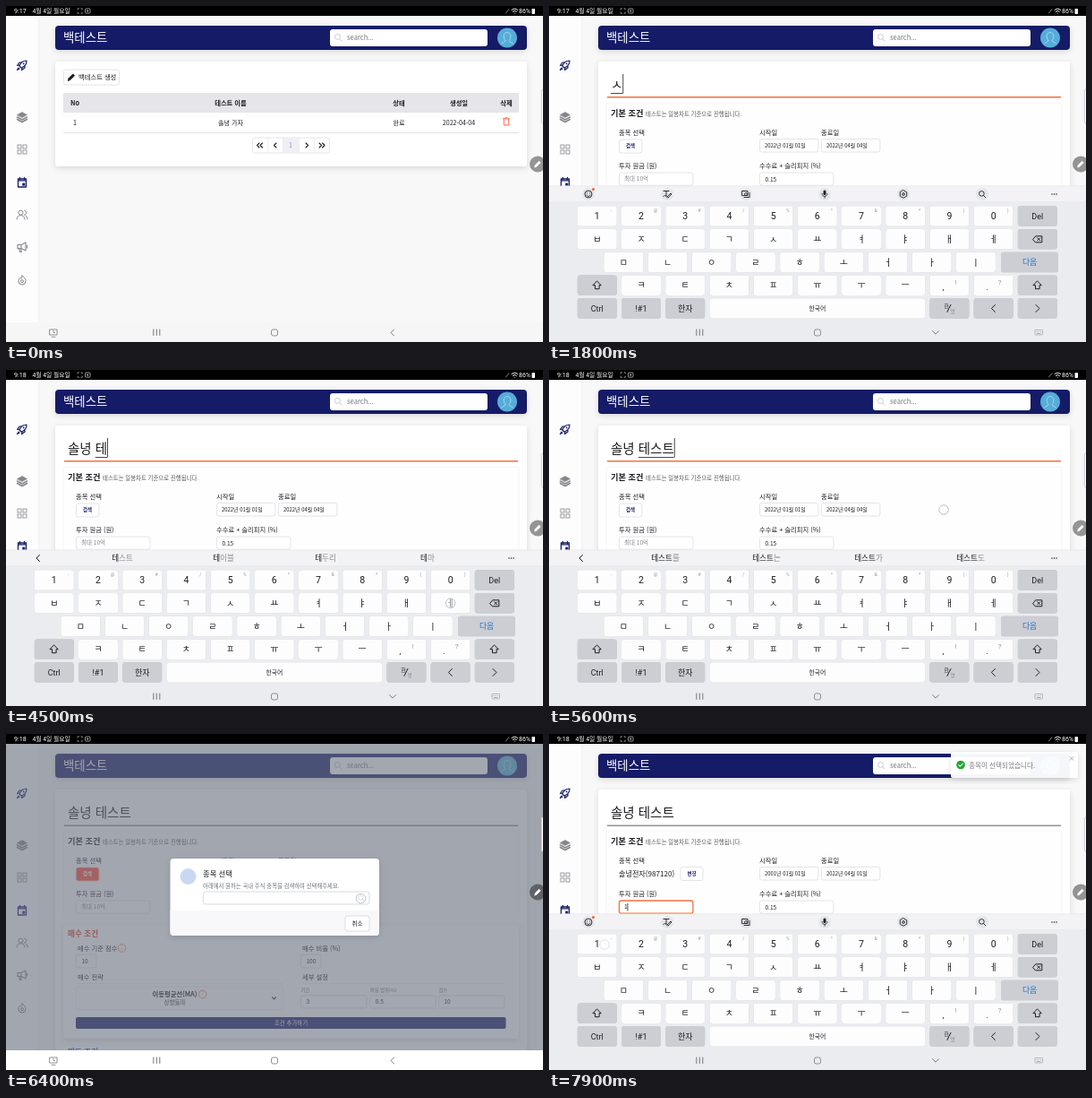
Animation of 600 by 375 pixels, one loop 8 s. Source, as an HTML page:

```html
<!DOCTYPE html>
<html lang="ko">
<head>
<meta charset="utf-8">
<title>백테스트</title>
<style>
html, body { margin: 0; width: 100%; height: 100%; overflow: hidden; background: #f8f8f9; }
svg { display: block; width: 600px; height: 375px; }
text { font-family: "Noto Sans CJK KR", "Noto Sans CJK", "Noto Sans", sans-serif; white-space: pre; }
.ui text { font-family: Roboto, "Noto Sans CJK KR", "Noto Sans CJK", sans-serif; }
.soft { filter: drop-shadow(0 2px 3px rgba(0, 0, 0, .13)); }
.key { filter: drop-shadow(0 .6px .3px rgba(0, 0, 0, .2)); }
</style>
</head>
<body>
<svg id="stage" viewBox="0 0 600 375"></svg>
<script>
const NAVY = '#151b66', ORANGE = '#f4713f', INK = '#1c1c22', GRAY = '#85858b', LINE = '#dcdde3';
const LOOP = 8000, STEP = 100, KB_H = 174;

// Drawing helpers; text is placed by its vertical centre.
const text = (x, y, s, size = 7.3, fill = INK, anchor = 'start', weight = 400, id = '') =>
  `<text ${id && `id="${id}"`} x="${x}" y="${y + size * .37}" font-size="${size}" fill="${fill}" text-anchor="${anchor}" font-weight="${weight}">${s}</text>`;
const mid = (x, y, s, size, fill, weight) => text(x, y, s, size, fill, 'middle', weight);
const rect = (x, y, w, h, r = 0, fill = '#fff', stroke = 'none', extra = '') =>
  `<rect x="${x}" y="${y}" width="${w}" height="${h}" rx="${r}" fill="${fill}" stroke="${stroke}" stroke-width=".8" ${extra}/>`;
const circle = (x, y, r, fill = 'none', stroke = 'none', w = 1) =>
  `<circle cx="${x}" cy="${y}" r="${r}" fill="${fill}" stroke="${stroke}" stroke-width="${w}"/>`;
const path = (d, stroke = GRAY, w = 1, fill = 'none') =>
  `<path d="${d}" stroke="${stroke}" stroke-width="${w}" fill="${fill}" stroke-linecap="round" stroke-linejoin="round"/>`;
const group = (id, body, attrs = '') => `<g id="${id}" ${attrs}>${body}</g>`;
const at = (x, y, body, s = 1) => `<g transform="translate(${x} ${y}) scale(${s})">${body}</g>`;
const box = (x, y, w, h) => rect(x, y, w, h, 2.5, '#fff', LINE);
const field = (x, y, w, h, s, size = 6.6, fill = INK) => box(x, y, w, h) + text(x + 6, y + h / 2, s, size, fill);
const lens = (x, y, c, r = 3) => circle(x - .6, y - .6, r, 'none', c, .9) + path(`M${x + r * .6} ${y + r * .6}l2.2 2.2`, c, .9);
const pencil = c => path('M-4 4l.6-2.6L2-4l2 2-5.4 5.4z', c, 1, c);
const info = (x, y) => circle(x, y, 4.3, 'none', ORANGE, .8) + mid(x, y, 'i', 5, ORANGE);

const sideIcons = [
  [66, NAVY, c => path('M5-5C1-5-2-2-3 1l2 2c3-1 6-4 6-8zM-3 0l-2.5.5L-3-3h2M0 3l-.5 2.5L3 3V1M-4 3l-1.5 2.5L-3 4', c, 1.2) + circle(1.6, -1.6, .9, c)],
  [124, GRAY, c => path('M-5.5-2.5L0-5.5l5.5 3L0 .5z', c, .6, c) + path('M-5.5 0L0 3l5.5-3M-5.5 2.5L0 5.5l5.5-3', c, 1.5)],
  [160, GRAY, c => [[-5, -5], [1, -5], [-5, 1], [1, 1]].map(p => rect(...p, 4, 4, 0, 'none', c)).join('')],
  [197, NAVY, c => path('M-4.5-4h9v9h-9zM-4.5-2.2h9M-2.5-5.5v2M2.5-5.5v2', c, 1.3) + rect(.3, .6, 3, 3, 0, c)],
  [233, GRAY, c => circle(-1.5, -2.3, 2.5, 'none', c) + path('M-6 5c0-6 9-6 9 0M2.5-4.8c3 0 3 5 0 5M4 1c1.6 1 2 2.5 2 4', c)],
  [269, GRAY, c => path('M-5-2.5h4l5-2.5V4L-1 1.5h-4zM-1-2.5v4M-3.5 1.5l1 4h1.8l-.8-4M5.5-2v3', c, 1.1)],
  [306, GRAY, c => path('M0-5c4 3 4 5 4 6a4 4 0 01-8 0c0-2 1-3 2-4 .5 1 1 1 1.5.8C0-3 0-4 0-5z', c) + circle(0, 1.2, 1.5, 'none', c)]
];

function shell() {
  return rect(0, 0, 600, 375, 0, '#f8f8f9') + rect(0, 11, 37, 342, 0, '#fdfdfe') + rect(36.5, 11, .6, 342, 0, '#ececf0') +
    sideIcons.map(([y, c, draw]) => at(18, y, draw(c))).join('') +
    rect(55, 22, 527, 27, 4, NAVY, 'none', 'class="soft"') + text(64, 35.5, '백테스트', 13.4, '#fff') +
    rect(362, 26, 176, 19, 3) + lens(371, 35, '#c3c5cc') + text(381, 35.5, 'search...', 7.6, '#73757d') +
    circle(560, 35.5, 11, '#55add9') + at(560, 35.5, path('M-2 3c-3-3-2.5-9 2-9s5 6 2 9c0 2 4 2 5 4M-2 3c0 2-4 2-5 4', '#b9e0f1', .8));
}

function listPage() {
  const cols = [[77, 'No', '1'], [251, '테스트 이름', '솔녕 가자'], [439, '상태', '완료'], [506, '생성일', '2022-04-04'], [559, '삭제', '']];
  const arrows = [['M-.5-2.5L-3 0l2.5 2.5M3-2.5L.5 0 3 2.5', 283.5], ['M1-2.5L-1.5 0 1 2.5', 301], ['M-1-2.5L1.5 0-1 2.5', 336], ['M.5-2.5L3 0 .5 2.5M-3-2.5L-.5 0-3 2.5', 353]];
  return rect(55, 62, 527, 117, 3, '#fff', 'none', 'class="soft"') +
    box(64.5, 71, 62, 17) + at(73, 79.5, pencil(INK), .9) + text(81, 79.5, '백테스트 생성') +
    rect(64, 97, 509, 22, 0, '#e5e5ea') + rect(64, 141, 509, .8, 0, '#dddde2') +
    cols.map(([x, a, b]) => mid(x, 108, a, 7.3, INK, 700) + mid(x, 130, b, 7.1)).join('') +
    at(559, 129, path('M-3.5-3.2h7M-1-4.2h2M-2.7-3v7h5.4v-7', '#ff6a45', 1)) +
    box(275.4, 147, 86, 17) + rect(309.5, 147.4, 17.5, 16.2, 0, '#efeff5') +
    [292.5, 309.5, 327, 344].map(x => rect(x, 147, .6, 17, 0, '#e3e3e8')).join('') +
    arrows.map(([d, x]) => at(x, 155.5, path(d, INK, 1.1))).join('') + mid(318, 155.5, '1', 7, '#8d87d6');
}

function formPage() {
  const label = (x, y, s) => text(x, y, s, 7.3);
  return rect(55, 62, 527, 330, 3, '#fff', 'none', 'class="soft"') +
    '<rect id="rule" x="65"/>' + text(69, 88, '', 14.5, INK, 'start', 400, 'title') +
    '<rect id="under" y="97" height=".9" fill="#333"/><rect id="caret" y="76" width=".9" height="21.5" fill="#333"/>' +
    rect(64, 108, 509, 98, 2, '#fefefe', '#f3f3f5') +
    text(69, 120, '기본 조건', 9.2, INK, 'start', 700) + text(108, 120.5, '테스트는 일봉차트 기준으로 진행됩니다.', 6.4, '#55565c') +
    label(78, 141, '종목 선택') + label(235, 141, '시작일') + label(304, 141, '종료일') +
    label(78, 178.5, '투자 원금 (원)') + label(235, 178.5, '수수료 + 슬리피지 (%)') +
    group('before', '<rect id="pick" x="78.4" y="149" width="25.5" height="15" rx="2.5" stroke-width=".8"/>' +
      text(91, 156.5, '검색', 5.4, NAVY, 'middle', 700, 'pickText') +
      text(241, 156, '2022년 01월 01일', 5.9) + text(310, 156, '2022년 04월 04일', 5.9)) +
    group('after', text(78, 156, '솔녕전자(987120)', 8.1) + box(147, 148.5, 25, 15) + mid(159.5, 156, '변경', 5.4, NAVY, 700) +
      text(241, 156, '2001년 01월 01일', 5.9) + text(310, 156, '2022년 04월 01일', 5.9)) +
    rect(235.4, 148.4, 65.5, 14.6, 2.5, 'none', LINE) + rect(304.4, 148.4, 65.5, 14.6, 2.5, 'none', LINE) +
    '<rect id="cash" x="78.4" y="186" width="82.5" height="14.2" rx="2.5" fill="#fff"/>' +
    text(84, 193, '', 6.5, INK, 'start', 400, 'cashText') + '<rect id="cashCaret" x="87.6" y="189" width=".7" height="8.5"/>' +
    field(235.4, 186, 82.5, 14.2, '0.15') +
    rect(64, 214, 509, 126, 2, '#fff', 'none', 'class="soft"') +
    text(69, 223, '매수 조건', 8.6, '#e8352e', 'start', 700) +
    label(80, 239, '매수 기준 점수') + info(129.5, 239) + label(331, 239, '매수 비율 (%)') +
    field(78.4, 246, 22.5, 15, '10') + field(329.4, 246, 22.5, 15, '100') +
    label(80, 271.5, '매수 전략') + label(331, 271.5, '세부 설정') +
    rect(80, 278, 229, .6, 0, '#ececf0') + rect(331, 278, 227, .6, 0, '#ececf0') +
    rect(78.4, 282, 231, 25.5, 2.5, '#fff', '#ededf1') + mid(188.5, 290.5, '이동평균선(MA)', 7.3, INK, 700) + info(219.5, 290.5) +
    mid(188.5, 300, '상향돌파', 6.5, '#333') + path('M297.5 293.8l2 2 2-2', INK, 1.1) +
    [[329.4, '기간', '3'], [406.7, '허용 범위(%)', '0.5'], [483.4, '점수', '10']].map(([x, a, b]) =>
      text(x, 286, a, 5.4, '#777') + field(x, 291.8, 73.5, 14.2, b)).join('') +
    rect(78, 316, 480.5, 13, 2, NAVY) + mid(318.5, 322.5, '조건 추가하기', 6.4, '#fff') +
    text(69, 355, '매도 조건', 8.6, '#2a62e8', 'start', 700);
}

function modalBox() {
  return rect(0, 11, 600, 342, 0, 'rgba(107,114,128,.62)') +
    rect(183.5, 139, 233.5, 86, 4, '#fff', 'none', 'class="soft"') +
    path('M183.5 197h233.5v24q0 4-4 4h-225.500q-4 0-4-4z', 'none', 0, '#f8f8fa') +
    circle(203.5, 159, 9, '#c9d8f2') + text(220, 155.5, '종목 선택', 8.3) +
    text(220, 169.5, '아래에서 원하는 국내 주식 종목을 검색하여 선택해주세요.', 6.35, '#6d7079') +
    rect(220.4, 176, 185.5, 14, 2.5, '#fff', '#cfd1d8') + lens(397, 183, '#b3b6be', 2.6) +
    rect(379, 203, 27, 17, 2.5, '#fff', '#d4d5db') + mid(392.5, 211.5, '취소', 6.6);
}

function toastBox() {
  return rect(449, 20, 142, 29, 2, '#fff', 'none', 'class="soft"') + circle(460, 34.5, 4.8, '#16a328') +
    path('M457.8 34.6l1.6 1.6 2.9-3.2', '#fff', 1.1) + text(469, 34.8, '종목이 선택되었습니다.', 7.6, '#76767c') +
    path('M582.2 25.600l3.600 3.600M585.800 25.600l-3.600 3.600', '#8f8f95', .7);
}

// Keyboard geometry
const PITCH = 49.2, keyX = (i, row) => (row === 2 ? 83.3 : 53.8) + i * PITCH;
const rowY = [234.5, 260.3, 286, 311.7, 337.5];
const ROWS = ['1234567890', 'ㅂㅈㄷㄱㅅㅛㅕㅑㅐㅔ', 'ㅁㄴㅇㄹㅎㅗㅓㅏㅣ', ' ㅋㅌㅊㅍㅠㅜㅡ'];
const keyPos = ch => {
  const row = ROWS.findIndex(r => r.includes(ch));
  return [keyX(ROWS[row].indexOf(ch), row), rowY[row]];
};

function keyboard() {
  const cap = (x, y, w = 44, fill = '#fdfdfe') => rect(x - w / 2, y - 11.3, w, 22.6, 3, fill, 'none', 'class="key"');
  const dark = '#cdced3';
  let s = rect(0, 201, 600, KB_H, 0, '#ebecef') + rect(0, 201, 600, 17, 0, '#f3f3f5') + rect(0, 200.6, 600, .6, 0, '#dedfe3');
  ROWS.forEach((row, r) => [...row].forEach((ch, i) => {
    if (ch !== ' ') s += cap(keyX(i, r), rowY[r]) + mid(keyX(i, r), rowY[r], ch, r ? 10 : 10.5);
  }));
  [...'-@#/%^&amp;*()'.replace('&amp;', '&')].forEach((c, i) => s += mid(keyX(i, 0) + 16, 228, c === '&' ? '&amp;' : c, 5.2, '#999'));
  [[',', '!', 8], ['.', '?', 9]].forEach(([a, b, i]) => {
    const x = keyX(i, 3);
    s += cap(x, rowY[3]) + mid(x - 7, 314, a, 9) + mid(x + 7, 308.5, b, 8, '#999');
  });
  const special = (i, r, label, size = 9) => cap(keyX(i, r), rowY[r], 44, dark) + mid(keyX(i, r), rowY[r], label, size);
  const draw = (i, r, d) => special(i, r, '') + at(keyX(i, r), rowY[r], path(d, INK, 1));
  const shift = 'M0-4.5l4.500 4.500h-2.200v4h-4.600v-4h-2.200z';
  return s + special(10, 0, 'Del') + draw(10, 1, 'M-5 0l3-3.500h7v7h-7zM0-1.500l3 3M3-1.500l-3 3') +
    cap(537, rowY[2], 64, dark) + mid(537, rowY[2], '다음', 8.800, '#1a72d8') +
    draw(0, 3, shift) + draw(10, 3, shift) +
    special(0, 4, 'Ctrl') + special(1, 4, '!#1') + special(2, 4, '한자', 9) +
    cap(300, rowY[4], 240) + mid(300, rowY[4], '한국어', 6.800) +
    draw(8, 4, 'M-2.5 4l4-8') + mid(444, 334.5, '한', 5.5) + mid(451, 341, '영', 5.5, '#888') +
    draw(9, 4, 'M1.800-4l-4 4 4 4') + draw(10, 4, 'M-1.800-4l4 4-4 4') +
    [562, 564.500, 567].map(x => circle(x, 210, .75, INK)).join('') + group('tools', tools()) +
    group('words', path('M37.500 206.500L34 210l3.500 3.500', INK, 1) + [130, 243, 357, 471].map(x => mid(x, 210, '', 8.600)).join(''));
}

function tools() {
  const icons = [
    circle(0, 0, 4, 'none', INK, .9) + path('M-2 1c1 2 3 2 4 0M-1.500-1.200v.2M1.500-1.200v.2', INK, .9) + circle(5.500, -5.500, 1.500, '#f2602d'),
    path('M-4-3.500h6M-1-3.500v6M0 3l4-4 1 1-4 4zM-4 2.500c1-2 2-1 3 0', INK, .9),
    path('M-4-3.500h6v5h-6zM-2 3.500h6v-5', INK, .9) + circle(0, 0, 1.500, 'none', INK, .8),
    rect(-1.500, -4.500, 3, 5.500, 1.500, INK) + path('M-3-.5c0 4 6 4 6 0M0 2.600v1.600', INK, .8),
    path('M0-4.300l3.700 2.150v4.300L0 4.300l-3.700-2.150v-4.300z', INK, .9) + circle(0, 0, 1.400, 'none', INK, .9),
    lens(0, 0, INK, 2.800)
  ];
  return icons.map((g, i) => at(44 + 88 * i, 210, circle(0, 0, 7, '#e5e6e9') + g)).join('');
}

function navBar() {
  return '<rect id="navBg" y="353" width="600" height="22"/>' +
    path('M164.800 361v6.500M168.300 361v6.500M171.800 361v6.500', '#77777b', 1) + rect(296.500, 361, 7, 7, 2, 'none', '#77777b') +
    group('navPage', path('M433.500 361l-3.500 3.500 3.500 3.500', '#77777b', 1) +
      path('M49 361h8v6h-8zM51 369.300h4M53 362.500v2h1.500', GRAY, .9)) +
    group('navKeys', path('M428.500 362.700l3.500 3.500 3.500-3.500', '#77777b', 1) + rect(543, 361.500, 8.500, 5.500, .5, 'none', '#aaa') +
      path('M545 363.500h.1M547.200 363.500h.1M549.400 363.500h.1M545.500 365.500h3.500', '#999', .8));
}

function statusBar() {
  return rect(0, 0, 600, 11, 0, '#000') + text(9, 5.500, '', 7.2, '#fff', 'start', 400, 'clock') +
    text(29.500, 5.500, '4월 4일 월요일', 6.800, '#fff') +
    path('M80 4v-1.200h1.500M84 2.800h1.200V4M80 7v1.200h1.500M84 8.200h1.200V7', '#bbb', .7) +
    rect(88.500, 3, 5.500, 5, 1, 'none', '#bbb') + circle(91.200, 5.500, 1, '#bbb') +
    path('M558.500 8l3.500-4.500', '#999', .8) +
    path('M565 4.500q3.300-3 6.600 0M566.300 6.200q2-1.800 4 0M568.300 8v.1', '#fff', 1) +
    text(573, 5.500, '86%', 7, '#fff') + rect(587.500, 3, 3.500, 6, .8, '#fff');
}

document.getElementById('stage').innerHTML =
  shell() + group('list', listPage()) + group('form', formPage()) + group('modal', modalBox()) + group('toast', toastBox()) +
  group('kb', keyboard(), 'class="ui"') + navBar() + group('status', statusBar(), 'class="ui"') +
  rect(598.300, 93, 4, 38, 1.500, '#fff', '#c2c2c6') + circle(594, 176.500, 9, 'rgba(0,0,0,.4)') + at(594, 176.500, pencil('#fff'), .8) +
  '<circle id="touch" r="5.300" fill="rgba(255,255,255,.45)" stroke="#b3bac6" stroke-width=".9"/>';

const $ = Object.fromEntries([...document.querySelectorAll('[id]')].map(e => [e.id, e]));
const wordEls = [...$.words.querySelectorAll('text')];

// Timeline: [start ms, ...values]
const kbDrop = [[0, KB_H], [1100, 115], [1200, 42], [1300, 9], [1400, 0], [5700, 55], [5800, 135], [5900, KB_H], [7300, 115], [7400, 42], [7500, 9], [7600, 0]];
const typed = [[0, '', ''], [1700, '', 'ㅅ'], [2000, '', '소'], [2300, '', '솔'], [2600, '', '솔ㄴ'], [2900, '', '솔녀'], [3100, '', '솔녕'],
  [3900, '솔녕 ', ''], [4200, '솔녕 ', 'ㅌ'], [4500, '솔녕 ', '테'], [4700, '솔녕 ', '텟'], [4900, '솔녕 ', '테스'], [5100, '솔녕 ', '테슽'], [5300, '솔녕 ', '테스트'], [5700, '솔녕 테스트', '']];
const hints = [[0, '', ''], [2000, '소', '식 리 개 금'], [2300, '솔', '직히 로 잎 길'], [2900, '솔녀', '는 가 도 를'], [3100, '솔녕', '전자 동 역 화재', true],
  [3900, '', ''], [4500, '테', '스트 이블 두리 마'], [5300, '테스트', '를 는 가 도'], [5700, '', '']];
const touches = [[300, 97, 79.500], [900, 240, 88], [3900, 300, 337.500], [5600, 441, 156], [6100, 91, 156.500], [6400, 396.500, 183.500], [6900, 240, 114], [7200, 120, 193], [7800, 62, 235],
  ...[[1600, 'ㅅ'], [2000, 'ㅗ'], [2300, 'ㄹ'], [2600, 'ㄴ'], [2900, 'ㅕ'], [3100, 'ㅇ'], [4200, 'ㅌ'], [4500, 'ㅔ'], [4700, 'ㅅ'], [4900, 'ㅡ'], [5100, 'ㅌ'], [5300, 'ㅡ']].map(([t, c]) => [t, ...keyPos(c)])];
const now = (table, t) => table.reduce((hit, row) => row[0] <= t ? row : hit);
const show = (el, on) => el.style.display = on ? '' : 'none';
const set = (el, attrs) => { for (const k in attrs) el.setAttribute(k, attrs[k]); };

function render(t) {
  const form = t >= 500, picked = t >= 6900, modal = t >= 6200 && !picked;
  const titleFocus = t >= 900 && t < 5700, cashFocus = t >= 7200, hot = t >= 6100;
  $.clock.textContent = t < 2400 ? '9:17' : '9:18';
  show($.list, !form); show($.form, form); show($.modal, modal);
  show($.before, !picked); show($.after, picked);
  $.modal.style.opacity = t < 6300 ? .5 : 1;
  set($.rule, titleFocus ? { y: 101, width: 507, height: 1.500, fill: ORANGE } : { y: 101.700, width: 507, height: .9, fill: '#4a4a50' });
  set($.pick, hot ? { fill: '#ff4a35', stroke: '#ffb09f' } : { fill: '#fff', stroke: LINE });
  set($.pickText, { fill: hot ? '#fff' : NAVY });

  const [, done, live] = now(typed, t);
  $.title.textContent = done;
  const from = 69 + $.title.getComputedTextLength();
  $.title.textContent = done + live;
  const end = 69 + $.title.getComputedTextLength();
  set($.under, { x: from, width: live ? end - from : 0 });
  set($.caret, { x: end });
  show($.caret, titleFocus);

  const one = t >= 7800;
  set($.cash, { stroke: cashFocus ? ORANGE : LINE, 'stroke-width': cashFocus ? 1.300 : .8 });
  $.cashText.textContent = one ? '1' : '최대 10억';
  set($.cashText, { fill: one ? INK : '#85868c' });
  set($.cashCaret, { x: one ? 87.600 : 84 });
  show($.cashCaret, cashFocus);

  const drop = now(kbDrop, t)[1], open = drop < KB_H;
  set($.kb, { transform: `translate(0 ${drop})` });
  show($.kb, open); show($.navKeys, open); show($.navPage, !open);
  set($.navBg, { fill: open ? '#ebecef' : modal ? '#fff' : '#f6f6f7' });
  const [, stem, tails, plain] = now(hints, t);
  show($.tools, !stem); show($.words, stem);
  tails.split(' ').forEach((tail, i) => {
    wordEls[i].innerHTML = `${stem}<tspan fill="${plain ? INK : '#8a8a90'}">${tail}</tspan>`;
  });

  show($.toast, t >= 7100);
  const slide = now([[0, 151], [7100, 90], [7200, 28], [7300, 0]], t)[1];
  set($.toast, { transform: `translate(${slide} 0)`, opacity: .96 });

  const tap = touches.find(([s]) => t >= s && t < s + 2 * STEP);
  show($.touch, tap);
  if (tap) set($.touch, { cx: tap[1], cy: tap[2], opacity: t === tap[0] ? 1 : .45 });
}

let last = -1;
function tick() {
  const t = Math.floor(performance.now() % LOOP / STEP) * STEP;
  if (t !== last) render(last = t);
  requestAnimationFrame(tick);
}
tick();
</script>
</body>
</html>
```
